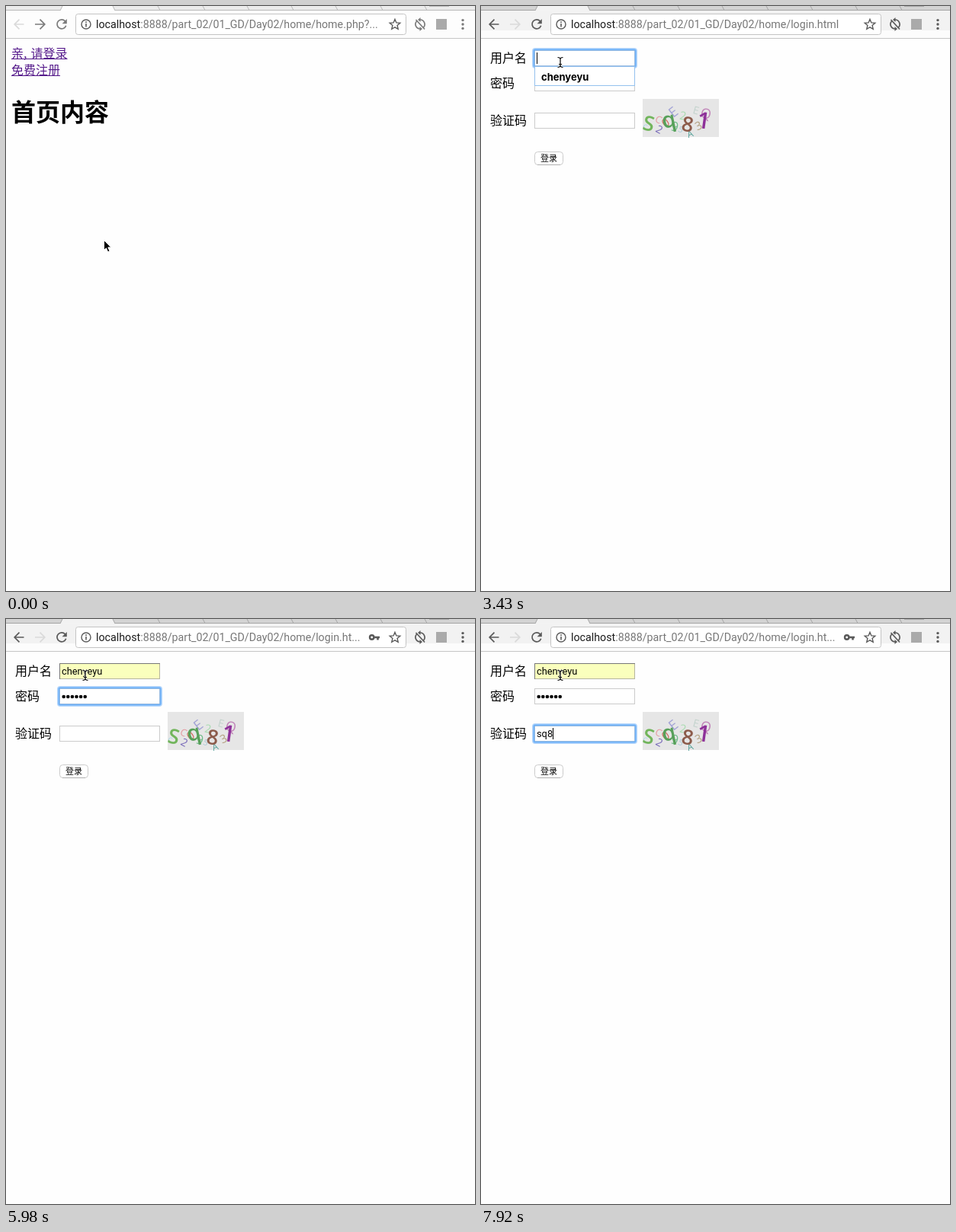
Animation of 615 by 768 pixels, one loop 8000 ms. Source, as an HTML page:

```html
<!DOCTYPE html>
<html lang="zh">
<head>
<meta charset="utf-8">
<style>
html, body { margin: 0; width: 100%; height: 100%; overflow: hidden; background: #fefefe; }
svg { display: block; width: 615px; height: 768px; }
text { white-space: pre; }
.cjk { font: 16px "Noto Sans CJK SC", "Noto Sans CJK", sans-serif; }
.ui { font: 14.24px Roboto, sans-serif; }
.field { font: 12.8px Roboto, sans-serif; }
.icon { fill: none; stroke: var(--ink); stroke-width: 1.7; }
#chrome { --ink: #5a5a5a; --tab: #d3d3d3; --edge: #a6a6a6; --bar: #f2f2f2; }
#chrome.idle { --ink: #7b7b7b; --tab: #ebebeb; --edge: #b9b9b9; --bar: #fdfdfd; }
</style>
</head>
<body>
<svg viewBox="0 0 615 768">
  <rect width="615" height="768" fill="#fefefe"/>

  <g id="chrome">
    <rect width="615" height="42" fill="#fcfcfc"/>
    <rect y="5" width="615" height="27" fill="var(--bar)"/>
    <rect width="615" height="5" fill="var(--tab)"/>
    <path d="M0 5.5H615" stroke="var(--edge)"/>
    <path d="M71 6.2L74 0H140L143 6.2Z" fill="var(--bar)"/>
    <path id="tabs" fill="none" stroke="var(--edge)"/>
    <path d="M555 0.5H581" stroke="var(--edge)"/>
    <path d="M0 42.5H615" stroke="#c6c6c6"/>
    <path id="back" class="icon" d="M23.5 24H11.5M17.5 17.7L11.2 24L17.5 30.3"/>
    <path id="next" class="icon" d="M38 24H50.5M44.5 17.7L50.8 24L44.5 30.3"/>
    <path class="icon" d="M77.6 20A6 6 0 1 0 78.7 25.8"/>
    <path d="M79.8 17V23.2H73.6Z" fill="var(--ink)"/>
    <rect x="91.5" y="10.5" width="433" height="27" rx="3" fill="#fff" stroke="#c4c4c4"/>
    <g fill="none" stroke="#5a5a5a">
      <circle cx="105" cy="24" r="6" stroke-width="1.4"/>
      <path d="M105 23V27.5M105 20.3V21.9" stroke-width="1.6"/>
      <path d="M510 17.4L511.9 21.9L516.8 22.3L513.1 25.5L514.2 30.3L510 27.8L505.8 30.3L506.9 25.5L503.2 22.3L508.1 21.9Z" stroke-width="1.4"/>
    </g>
    <g id="key" fill="none" stroke="#5a5a5a">
      <circle cx="479.7" cy="24" r="2.7" stroke-width="2.4"/>
      <path d="M483 24H490M487.5 24V27.5" stroke-width="2.6"/>
    </g>
    <text class="ui" x="118" y="29.2" fill="#777"><tspan fill="#1c1c1c">localhost</tspan><tspan id="url"></tspan></text>
    <path class="icon" d="M543 30A6 6 0 0 1 538.5 20M543 18A6 6 0 0 1 547.5 28M537.5 18L549 30.5"/>
    <path d="M543.5 15V21L540 18ZM542.5 27V33L546 30Z" fill="var(--ink)"/>
    <rect x="564" y="17" width="14" height="14" fill="#aaa"/>
    <g fill="var(--ink)">
      <circle cx="599" cy="18.6" r="1.7"/><circle cx="599" cy="24" r="1.7"/><circle cx="599" cy="29.4" r="1.7"/>
    </g>
  </g>

  <g id="home" class="cjk">
    <g fill="#551a8b">
      <text x="7" y="68">亲, <tspan x="32.5">请登录</tspan></text>
      <text x="7" y="90">免费注册</text>
      <path d="M7 69.5H80.5M7 91.5H71" stroke="#551a8b"/>
    </g>
    <text x="7" y="150.5" style="font-size:32px;font-weight:700">首页内容</text>
  </g>

  <g id="login">
    <g class="cjk">
      <text x="12" y="73.5">用户名</text>
      <text x="12" y="106.5">密码</text>
      <text x="12" y="155.5">验证码</text>
    </g>
    <g fill="#fff" stroke="#cbcbcb">
      <rect x="70.5" y="58.5" width="131" height="20"/>
      <rect x="70.5" y="91.5" width="131" height="20"/>
      <rect x="70.5" y="140.5" width="131" height="20"/>
      <rect x="70.5" y="191.5" width="37" height="17" rx="4"/>
    </g>
    <path d="M74 208.5H104" stroke="#b0b0b0"/>
    <text class="cjk" x="78" y="204" style="font-size:11px">登录</text>
    <g id="filled">
      <rect x="70.5" y="58.5" width="131" height="20" fill="#faffbd" stroke="#b5b5a0"/>
      <path d="M70.5 79V58.5H202" fill="none" stroke="#777"/>
    </g>
    <g id="ring" fill="none" stroke-width="2">
      <rect x="68" y="-2" width="136" height="25" rx="3" stroke="#b4d6fb"/>
      <rect x="69.5" y="-.5" width="133" height="22" rx="1" stroke="#6cb0f8"/>
    </g>
    <text id="user" class="field" x="73" y="73">chenyeyu</text>
    <g id="dots"></g>
    <text id="code" class="field" x="73" y="155.2"></text>
    <path id="caret" d="M0 0V15" stroke="#000"/>
    <g id="captcha"><rect x="212" y="122" width="100" height="50" fill="#e6e6e6"/></g>
    <g id="menu">
      <rect x="70.5" y="79.5" width="131" height="25" fill="#fff" stroke="#94c1ee"/>
      <rect id="pick" x="71" y="80" width="130" height="24" fill="#cdcdcd"/>
      <text x="79" y="97.5" style="font:bold 13px Inter,sans-serif">chenyeyu</text>
    </g>
    <g id="ime">
      <rect class="panel" x="45.5" y="167" width="257" height="39" rx="5" fill="#000" opacity=".1"/>
      <rect class="panel" x="46" y="165" width="256" height="38" rx="4" fill="#000" opacity=".13"/>
      <rect class="panel" x="46" y="164" width="254" height="37" rx="3" fill="#fff"/>
      <path d="M46 164H55V201H49Q46 201 46 198Z" fill="#f3f3f3"/>
      <path d="M48.5 171V198" stroke="#c4c4c4" stroke-width="3" stroke-dasharray="3 3"/>
      <path d="M55.5 164V201M58.5 164V201" stroke="#fbe0d3"/>
      <g id="words" class="cjk" style="font-weight:300"></g>
      <g id="pager" fill="none" stroke-width="1.7">
        <path d="M-4.5 179.5L0 175.5L4.5 179.5" stroke="#fbc9a2"/>
        <path d="M-4.5 188L0 192L4.5 188" stroke="#f0802a"/>
      </g>
    </g>
  </g>

  <g id="arrow"><path d="M.5 .5V13.5L3.4 10.8L5.6 15.8L8 14.7L5.8 9.9H9.8Z" stroke="#fff"/></g>
  <g id="hand">
    <path d="M3 2Q3 .7 4.3 .7T5.6 2V7Q7 5.5 8 7.2Q9.5 6.2 10.3 7.9Q12.5 7.2 12.9 9.5V12Q12.7 14.5 11.4 17.3H5.3Q4.8 15 3 13L.8 10Q.3 8.2 2 8.6L3 9.6Z" fill="#fff" stroke="#000" stroke-width="1.2"/>
    <path d="M6.4 11.5V15M8.3 11.5V15M10.2 11.5V15" stroke="#000" stroke-width=".8"/>
  </g>
  <g id="beam" fill="none">
    <path d="M-3.5 -6.5Q0 -6.5 0 -4V4Q0 6.5 -3.5 6.5M3.5 -6.5Q0 -6.5 0 -4V4Q0 6.5 3.5 6.5M-2 2.5H2" stroke="#fff" stroke-width="3" opacity=".7"/>
    <path d="M-3.5 -6.5Q0 -6.5 0 -4V4Q0 6.5 -3.5 6.5M3.5 -6.5Q0 -6.5 0 -4V4Q0 6.5 3.5 6.5M-2 2.5H2" stroke="#000" stroke-width="1.2"/>
  </g>
</svg>
<script>
const $ = id => document.getElementById(id);
const show = (id, on) => $(id).style.display = on ? '' : 'none';
const place = (id, x, y) => $(id).setAttribute('transform', `translate(${x} ${y})`);

// Each track lists [start time, value...]; a value holds until the next start.
const at = (track, t) => track.findLast(k => k[0] <= t).slice(1);

const pointer = [
  [0, 'arrow', 128, 307], [150, 'arrow', 125, 297], [300, 'arrow', 117, 262],
  [450, 'arrow', 105, 208], [600, 'arrow', 92, 150], [750, 'arrow', 80, 98],
  [900, 'hand', 69.5, 69], [1040, 'hand', 65, 64], [1190, 'hand', 63.5, 62],
  [2080, 'beam', 82, 68], [2230, 'beam', 98, 72], [2380, 'beam', 104, 74]
];
const urls = [
  [0, ':8888/part_02/01_GD/Day02/home/home.php?...'],
  [1640, ':8888/part_02/01_GD/Day02/home/login.html'],
  [4630, ':8888/part_02/01_GD/Day02/home/login.ht...']
];
const focusTop = [[0, 0], [2530, 58], [4030, 91], [6130, 140]];
const caretX = [
  [0, 0], [2530, 73.5], [2980, 0], [3430, 73.5], [3580, 0], [4030, 73.5], [4480, 0],
  [4630, 84.5], [4780, 90.5], [5080, 96.5], [5230, 101.5], [5530, 106.5], [5980, 0],
  [6130, 73.5], [6580, 79.5], [6880, 87.5], [7770, 0], [7920, 94.5]
];
const dotCount = [[0, 0], [4630, 2], [4780, 3], [5080, 4], [5230, 5], [5530, 6]];
const codes = [[0, ''], [6580, 's'], [6880, 'sq'], [7920, 'sq8']];

// Captcha glyphs: character, centre x, centre y, size, turn, colour
const glyphs = [
  ['E', 252, 139, 18, -38, '#a3a3d6'], ['2', 265, 144, 15, 10, '#a9dcb0'],
  ['E', 282, 137, 14, 15, '#c3d3cd'], ['Q', 295, 141, 18, 10, '#c184b8'],
  ['C', 233, 149, 13, 25, '#e59aa0'], ['2', 234, 162, 14, 28, '#7566b8'],
  ['0', 242, 153, 15, -35, '#d0685c'], ['9', 254, 158, 17, 12, '#6fbb88'],
  ['5', 262, 162, 11, 25, '#a8c9d8'], ['A', 274, 168, 12, -20, '#55a29a'],
  ['3', 285, 157, 15, -25, '#b3a080'], ['c', 216, 157, 10, 40, '#a5d9e5'],
  ['S', 220, 154, 27, 12, '#72b55c'], ['q', 246, 149, 29, -12, '#58a05a'],
  ['8', 271, 155, 27, 10, '#8c5b4b'], ['1', 292, 150, 30, 8, '#8e3199']
];
$('captcha').innerHTML += glyphs.map(([c, x, y, size, turn, fill]) =>
  `<text transform="translate(${x} ${y}) rotate(${turn})" y="${size * .36}" text-anchor="middle"
    fill="${fill}" style="font:${size > 25 ? 600 : 400} ${size}px 'Open Sans',sans-serif">${c}</text>`).join('');

$('tabs').setAttribute('d', [199, 258, 316, 374, 432, 491, 549]
  .map(x => `M${x} 0L${x + 3} 5.5`).join('') + 'M71 6L74 0M140 0L143 6');
$('dots').innerHTML = Array.from({length: 6}, (_, i) =>
  `<circle cx="${75.7 + i * 5.6}" cy="102" r="2.3"/>`).join('');

function setWords(list, step) {
  $('words').innerHTML = list.map((w, i) =>
    `<text x="${68 + i * step}" y="189" fill="${i ? '#555' : '#f0802a'}">${i + 1}.${w}</text>`).join('');
}

function fillIme(wide) {
  const extra = wide ? 82 : 0;
  setWords(wide ? ['社区', '申请', '上去', '时期', '事情'] : ['是', '说', '上', '啥', '↑'], wide ? 56.6 : 40.5);
  document.querySelectorAll('.panel').forEach((p, i) => p.setAttribute('width', [257, 256, 254][i] + extra));
  place('pager', 279.5 + extra, 0);
}

let wideIme;
function draw(now) {
  const t = now % 8000;
  const onLogin = t >= 1640;
  $('chrome').setAttribute('class', t < 450 ? 'idle' : '');
  show('home', !onLogin);
  show('login', onLogin);
  show('captcha', t >= 1790);
  $('back').style.stroke = onLogin ? '' : '#dadada';
  $('next').style.stroke = onLogin ? '#dadada' : '';
  $('url').textContent = at(urls, t)[0];
  show('key', t >= 4630);

  const [shape, px, py] = at(pointer, t);
  for (const id of ['arrow', 'hand', 'beam']) show(id, id === shape);
  place(shape, px, py);

  const [top] = at(focusTop, t), [cx] = at(caretX, t);
  show('ring', top);
  place('ring', 0, top);
  show('caret', cx);
  place('caret', cx, top + 3);

  show('menu', t >= 2530 && t < 3880);
  show('pick', t >= 3580);
  show('filled', t >= 3580);
  show('user', t >= 3580);
  const [dots] = at(dotCount, t);
  [...$('dots').children].forEach((d, i) => d.style.display = i < dots ? '' : 'none');

  $('code').textContent = at(codes, t)[0];
  $('code').style.textDecoration = t < 7170 ? 'underline' : 'none';
  show('ime', t >= 6580 && t < 7320);
  $('ime').style.opacity = t < 7170 ? 1 : .5;
  const wide = t >= 6880;
  if (wide !== wideIme) fillIme(wideIme = wide);
}

function loop() {
  draw(performance.now());
  requestAnimationFrame(loop);
}
loop();
</script>
</body>
</html>
```
